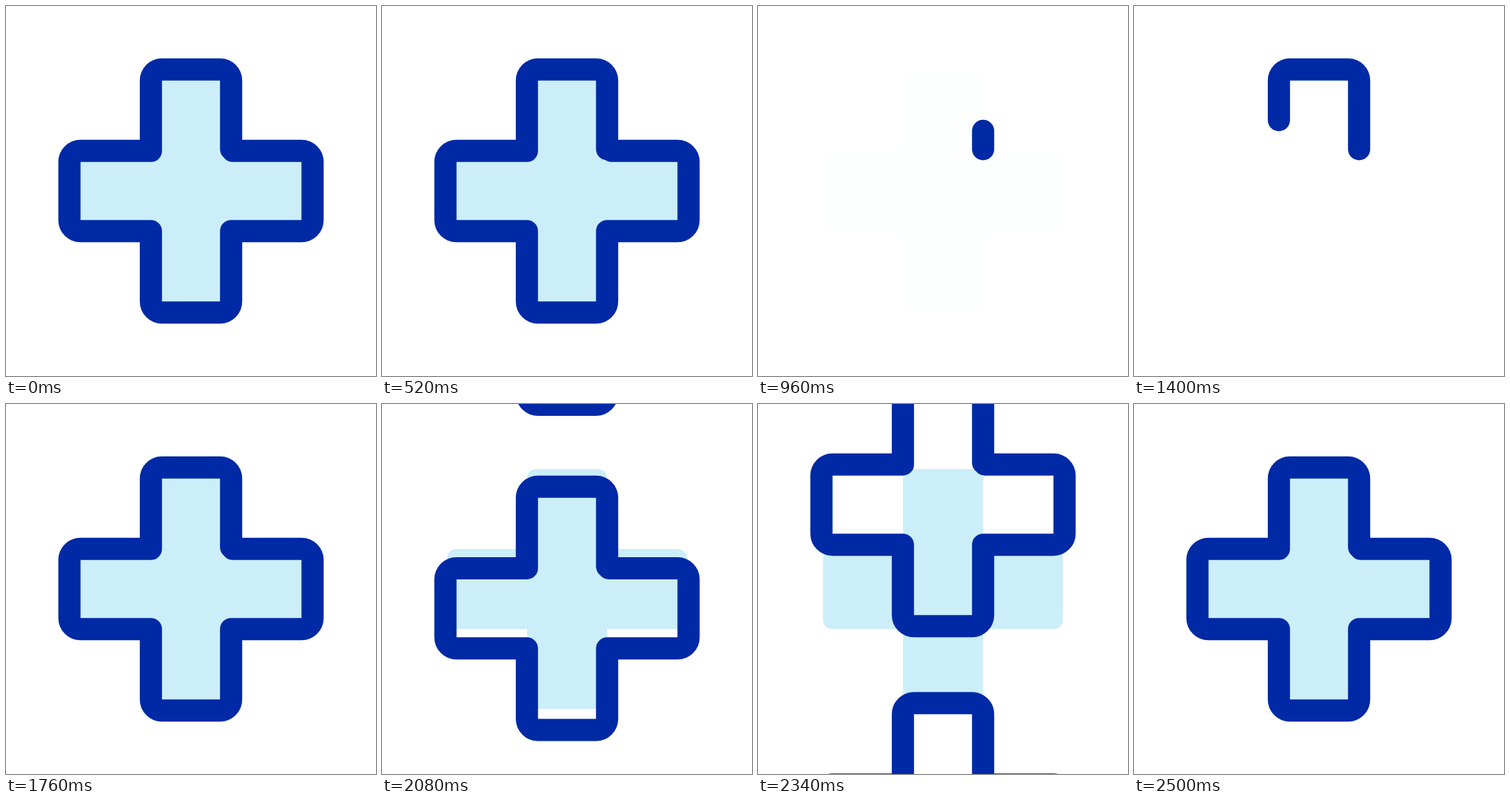
Animation, 500 px wide and 500 px high, one loop 3000 ms. Source, as an HTML page:

```html
<!DOCTYPE html>
<html lang="en">
<head>
<meta charset="utf-8">
<title>Medical cross</title>
<style>
  html, body { margin: 0; width: 100%; height: 100%; overflow: hidden; background: #fff; }
  svg { display: block; width: 100%; height: 100%; }
</style>
</head>
<body>
<svg viewBox="-250 -250 500 500">
  <defs>
    <path id="outline" pathLength="1" fill="none" stroke="#0029a5" stroke-width="30"
      stroke-linecap="round" stroke-linejoin="round"
      d="M54.2-56.5V-149.3a15 15 0 0 0-15-15H-39.2a15 15 0 0 0-15 15V-54.2
         H-149.3a15 15 0 0 0-15 15V39.2a15 15 0 0 0 15 15H-54.2
         V149.3a15 15 0 0 0 15 15H39.2a15 15 0 0 0 15-15V54.2
         H149.3a15 15 0 0 0 15-15V-39.2a15 15 0 0 0-15-15H56.5"/>
  </defs>
  <g id="body" fill="#cbeef8">
    <rect x="-162" y="-54" width="324" height="108" rx="12"/>
    <rect x="-54" y="-162" width="108" height="324" rx="12"/>
  </g>
  <use id="leaving" href="#outline"/>
  <use id="arriving" href="#outline"/>
</svg>
<script>
const LOOP = 3000;
const [outline, body, leaving, arriving] =
  ['outline', 'body', 'leaving', 'arriving'].map(id => document.getElementById(id));

// Eased progress from 0 to 1 between two times
function ease(time, from, to) {
  const t = Math.min(1, Math.max(0, (time - from) / (to - from)));
  return t * t * (3 - 2 * t);
}

function draw(ms) {
  // 50 pictures per second, posed on a 120 Hz timeline
  const time = Math.floor(Math.floor(ms / 20) * 2.4 + 1e-6) / 0.12;

  const erased = ease(time, 500, 1000);
  const drawn = 1 - erased + ease(time, 1250, 1750);
  outline.setAttribute('stroke-dasharray', `${drawn} 2`);
  outline.setAttribute('visibility', drawn > 0 ? 'visible' : 'hidden');
  body.setAttribute('opacity', 1 - erased + ease(time, 1500, 1750));

  const drop = ease(time, 2000, 2500);
  leaving.setAttribute('y', 430 * drop);
  arriving.setAttribute('y', 440 * (drop - 1));
}

const start = performance.now();
function tick() {
  draw((performance.now() - start) % LOOP);
  requestAnimationFrame(tick);
}
tick();
</script>
</body>
</html>
```
